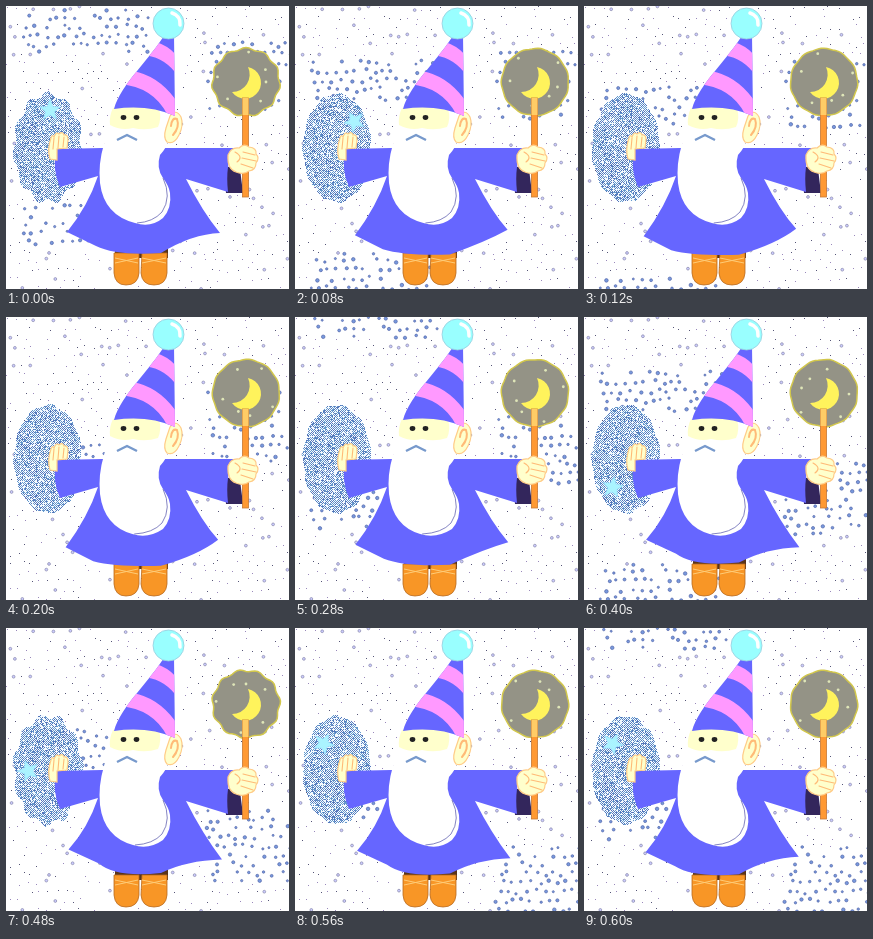
An HTML page with a canvas for the animation above (640 ms loop, 283 by 283 pixels).

```html
<!DOCTYPE html>
<html lang="en">
<head>
<meta charset="utf-8">
<title>Wizard</title>
<style>
  html, body { margin: 0; width: 100%; height: 100%; overflow: hidden; background: #fff; }
  canvas, svg { position: absolute; left: 0; top: 0; width: 283px; height: 283px; }
  .skin { fill: #ffffcc; stroke: #ffcc88; stroke-width: 1.2; }
  .line { fill: none; stroke: #ffbb77; stroke-width: 1.1; stroke-linecap: round; }
  .robe { fill: #6666ff; }
  .pink { fill: #ff99ff; }
  .boot { fill: #f89626; stroke: #b86a20; stroke-width: .8; }
</style>
</head>
<body>
<canvas id="sky" width="283" height="283"></canvas>
<svg viewBox="0 0 283 283">
  <defs>
    <clipPath id="cone">
      <path d="M159 28L168 28L169 110Q142 98 108 103C115 78 145 52 159 28Z"/>
    </clipPath>
  </defs>

  <path id="star" fill="#aaf4ff" stroke="#99ddff" stroke-width=".6"
    d="M0-11L2.8-3.5L10-3L4.5 2L6.5 9L0 5L-6.5 9L-4.5 2L-10-3L-2.8-3.5Z"/>

  <!-- boots -->
  <path fill="#5a3418" d="M109 238H162V252H109Z"/>
  <g class="boot">
    <path d="M108 247H133V267Q132 279 120 279Q109 279 108 267Z"/>
    <path d="M136 247H161V267Q160 279 148 279Q136 279 135 267Z"/>
  </g>
  <path d="M109 252L132 257M109 257L132 252M136 257L160 252M136 252L160 257"
    fill="none" stroke="#ffcc77" stroke-width="1"/>

  <!-- robe -->
  <path fill="#33265c" d="M218 160L234 163L237 187L220 187Z"/>
  <path id="robe" class="robe"/>

  <!-- wand -->
  <path id="disc" fill="#949386" stroke="#d2c74c" stroke-width="1.5"/>
  <path fill="#fff35c" d="M242 61A16 16 0 1 1 226 86A17.5 17.5 0 0 0 242 61Z"/>
  <g id="sparks" fill="#dfe6b8"></g>
  <rect x="236.5" y="92" width="6" height="99" fill="#ff9933" stroke="#c87832" stroke-width=".8"/>
  <rect x="236.5" y="92" width="6" height="17" fill="#ffcc66"/>

  <!-- hands -->
  <path class="skin" d="M44 153Q41 143 45 132Q46 128 48 131Q50 125 53 128Q57 125 58 129Q62 128 62 134L61 142L51 143L51 154Z"/>
  <path class="line" d="M48 132L47 143M53 130L52 142M58 131L57 141"/>
  <path class="skin" d="M222 149Q225 141 233 142Q238 137 243 141Q251 142 250 148Q254 152 250 157Q250 164 243 165Q237 169 230 166Q221 163 222 149Z"/>
  <path class="line" d="M237 146L249 149M236 152L250 155M235 158L247 162M229 146Q238 151 231 156"/>

  <!-- head -->
  <path id="beard" fill="#fff"/>
  <path id="fold" fill="none" stroke="#7777bb" stroke-width=".9"/>
  <path fill="#ffffcc" d="M107 102Q132 96 153 103Q156 112 152 121Q140 125 127 122Q115 125 104 119Q103 110 107 102Z"/>
  <path class="skin" d="M164 110Q170 102 175 111Q178 119 173 129Q168 139 161 136Q157 132 160 122Z"/>
  <path class="line" style="stroke-width:2" d="M165 120Q166 111 171 113Q174 121 167 129"/>
  <ellipse cx="117.5" cy="111.5" rx="2.8" ry="2.4" fill="#222"/>
  <ellipse cx="130.5" cy="111.5" rx="2.8" ry="2.4" fill="#222"/>
  <path d="M111 134L121 129L131 134" fill="none" stroke="#7799cc" stroke-width="2.4"/>

  <!-- hat -->
  <g clip-path="url(#cone)">
    <rect class="robe" x="100" y="25" width="72" height="90"/>
    <path class="pink" d="M150 36Q163 40 172 51V70Q158 50 136 49Z"/>
    <path class="pink" d="M127 65Q154 70 172 97V113L161 108Q147 81 114 78Z"/>
  </g>
  <circle cx="162.5" cy="17.5" r="15.5" fill="#99ffff" stroke="#99ccdd" stroke-width=".8"/>
  <path d="M166 7Q175 10 174 19" fill="none" stroke="#fff" stroke-width="3.5" stroke-linecap="round"/>
</svg>

<script>
const LOOP = 640, STEP = 40, SIZE = 283, TAU = Math.PI * 2;
const el = id => document.getElementById(id);
const ctx = el('sky').getContext('2d');
const set = (id, d) => el(id).setAttribute('d', d);

function random(seed) {
  return () => {
    seed = (seed + 0x6d2b79f5) | 0;
    let n = Math.imul(seed ^ (seed >>> 15), seed | 1);
    n ^= n + Math.imul(n ^ (n >>> 7), n | 61);
    return ((n ^ (n >>> 14)) >>> 0) / 4294967296;
  };
}

function dot(x, y, r, fill, line) {
  ctx.beginPath();
  ctx.arc(x, y, r, 0, TAU);
  ctx.fillStyle = fill;
  ctx.fill();
  ctx.strokeStyle = line;
  ctx.lineWidth = .7;
  ctx.stroke();
}

// Bands of larger dots sink on both sides of the figure.
function inBand(x, y, t) {
  if (x < 145) {
    const shift = (y - 25 - t * 390 / LOOP) / 195;
    return x > 15 && Math.abs(shift - Math.round(shift)) * 195 < 21;
  }
  const mid = 70 + 185 * Math.min(t / 560, 1) ** 1.5;
  return x > 200 && Math.abs(y - mid) < 36;
}

function drawDots(t) {
  const rnd = random(29);
  for (let row = 0; row < 32; row++) {
    for (let col = 0; col < 32; col++) {
      const x = col * 9 + (row % 2) * 4 + rnd() * 5;
      const y = row * 9 + rnd() * 5;
      const kind = rnd();
      if (inBand(x, y, t)) {
        if (kind < .8) dot(x, y, 1 + kind, '#7799dd', '#5566aa');
      } else if (kind < .1) {
        dot(x, y, 1.4, '#ccccff', '#8888aa');
      } else if (kind < .62) {
        ctx.fillStyle = kind < .4 ? '#9988bb' : '#555577';
        ctx.fillRect(Math.round(x), Math.round(y), 1, 1);
      }
    }
  }
}

const isRough = t => t % 240 === 0;

function drawMist(t) {
  const rnd = random(71 + t);
  const rough = isRough(t) ? .05 : .02;
  for (let y = 84; y < 200; y++) {
    for (let x = 4; x < 82; x++) {
      const dx = (x - 41.5) / 34, dy = (y - 141.5) / 54;
      const edge = 1 + rough * Math.sin(Math.atan2(dy, dx) * 11 + t);
      const pick = rnd();
      if (Math.hypot(dx, dy) > edge) continue;
      const on = (x + y) % 2 ? pick < .85 : pick < .14;
      ctx.fillStyle = on ? (rnd() < .5 ? '#5577bb' : '#6699cc') : '#f4faff';
      ctx.fillRect(x, y, 1, 1);
    }
  }
}

function discPath(t) {
  const amp = isRough(t) ? 1.1 : .4;
  let d = '';
  for (let i = 0; i < 72; i++) {
    const a = i / 72 * TAU;
    const r = 33.5 + amp * Math.sin(a * 11 + t);
    d += (i ? 'L' : 'M') + (240 + r * Math.cos(a)).toFixed(1) + ' ' + (76 + r * Math.sin(a)).toFixed(1);
  }
  return d + 'Z';
}

const sparks = Array.from({ length: 6 }, () => {
  const c = document.createElementNS('http://www.w3.org/2000/svg', 'circle');
  c.setAttribute('r', 1.4);
  return el('sparks').appendChild(c);
});

function draw(t) {
  const held = Math.min(t, 560);
  const turn = held / LOOP * TAU;
  const sway = Math.sin(t / LOOP * TAU);

  ctx.fillStyle = '#fff';
  ctx.fillRect(0, 0, SIZE, SIZE);
  drawDots(t);
  drawMist(t);

  const a = turn - TAU / 4;
  el('star').setAttribute('transform',
    `translate(${44 + 22 * Math.cos(a)} ${143 + 39 * Math.sin(a)}) rotate(${a * 57.3 + 90})`);
  el('star').style.opacity = t > 100 && t < 340 ? 0 : 1;

  // The right side of the hem lifts into a wave on the back swing.
  const left = 226 + 4.5 * sway, right = 227 - 4.5 * sway;
  const lift = right + 1 + 16 * Math.max(sway, 0);
  set('robe', `M50 143L96 142H228Q219 158 222 186L180 173Q196 205 ${214 - 2 * sway} ${right}
    Q${186 + 6 * sway} ${lift} 155 ${247 + 2 * sway}Q110 250 ${90 - 3 * sway} ${left + 14}L${61 - 1.5 * sway} ${left}
    Q82 200 92 170L54 181Q46 164 50 143Z`);

  const tip = 133 + 2 * Math.cos(turn);
  set('beard', `M105 103Q103 122 98 138Q92 158 94 177Q98 209 ${tip - 6} 217
    Q${tip + 10} 222 157 212Q166 202 164 187Q163 180 157 172Q150 162 154 149Q160 143 166 128V106Q135 95 105 103Z`);
  set('fold', `M157 172Q166 191 156 206Q147 216 ${tip - 4} 217`);

  set('disc', discPath(held));
  sparks.forEach((c, i) => {
    const b = i * 2.4 + turn, r = 20 + i * 5 % 11;
    c.setAttribute('cx', 240 + r * Math.cos(b));
    c.setAttribute('cy', 76 + r * Math.sin(b));
  });
}

let shown = -1;
const start = performance.now();
function tick() {
  const t = Math.floor((performance.now() - start) % LOOP / STEP) * STEP;
  if (t !== shown) draw(shown = t);
  requestAnimationFrame(tick);
}
tick();
</script>
</body>
</html>
```
